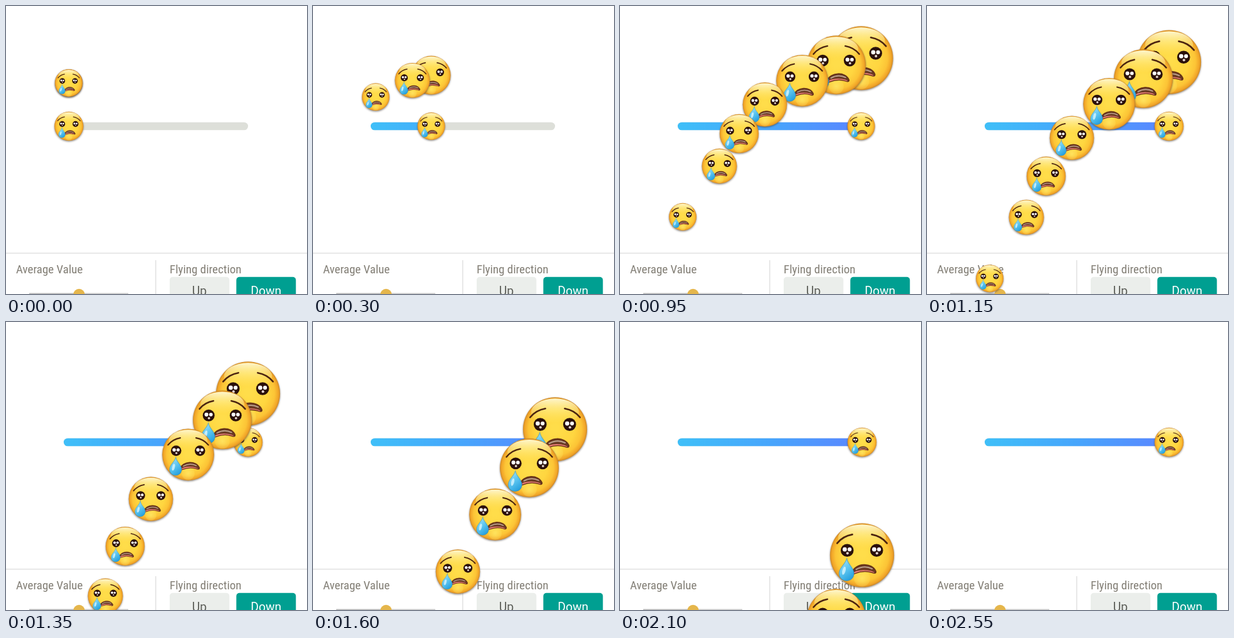
Recreate the animation shown at these times as an HTML page with a canvas. Size 480 by 460 pixels, loop 2600 ms.

```html
<!DOCTYPE html>
<html lang="en">
<head>
<meta charset="utf-8">
<title>Emoji slider</title>
<style>
  html, body { margin: 0; width: 100%; height: 100%; overflow: hidden; background: #fff; }
  canvas { display: block; }
</style>
</head>
<body>
<canvas id="stage" width="480" height="460"></canvas>
<script>
const ctx = document.getElementById('stage').getContext('2d');
const LOOP = 2600, LEFT = 100, RIGHT = 386, BAR_Y = 192, BAR_H = 12.6;
const RELEASE = 984, GRAVITY = 0.000232;

// Thumb path: [ms, x]
const DRAG = [[0, 100], [172, 158.5], [300, 188.5], [320, 190], [476, 231],
  [652, 290], [700, 290.5], [816, 345], [950, 384.5], [RELEASE, 386]];
// Dropped faces: [ms of drop, x, y]
const DROPS = [[-9, 100, 123], [172, 158.5, 115], [320, 190, 111.5], [476, 231, 105],
  [652, 290.5, 98.5], [816, 345, 90], [RELEASE, 386, 83]];

const clamp = v => Math.min(1, Math.max(0, v));
const progress = x => (x - LEFT) / (RIGHT - LEFT);
const faceRadius = x => 22.2 + 29.4 * progress(x);

function thumbX(t) {
  for (let i = 1; i < DRAG.length; i++) {
    const [t0, x0] = DRAG[i - 1], [t1, x1] = DRAG[i];
    if (t < t1) return x0 + (x1 - x0) * (t - t0) / (t1 - t0);
  }
  return RIGHT;
}

function box(x, y, w, h, r, fill) {
  ctx.fillStyle = fill;
  ctx.beginPath();
  ctx.roundRect(x, y, w, h, r);
  ctx.fill();
}

function oval(x, y, rx, ry, fill, turn = 0) {
  ctx.fillStyle = fill;
  ctx.beginPath();
  ctx.ellipse(x, y, rx, ry, turn, 0, Math.PI * 2);
  ctx.fill();
}

const disc = (x, y, r, fill) => oval(x, y, r, r, fill);

function label(text, x, y, font, color, align = 'left') {
  ctx.font = font;
  ctx.textAlign = align;
  ctx.fillStyle = color;
  ctx.fillText(text, x, y);
}

function textWidth(font) {
  ctx.font = font;
  return ctx.measureText('Average Value').width;
}

function gradient(g, ...stops) {
  stops.forEach(([at, color]) => g.addColorStop(at, color));
  return g;
}

// Headings are condensed where the font offers it, else regular and smaller.
const CONDENSED = 'condensed 19px "Roboto Condensed", Roboto, sans-serif';
const hasCondensed = textWidth(CONDENSED) < 0.95 * textWidth('19px Roboto, sans-serif');
const HEADING = hasCondensed ? CONDENSED : '17px Roboto, sans-serif';
const BUTTON = '19.3px Roboto, sans-serif';

const barFill = gradient(ctx.createLinearGradient(92, 0, 386, 0),
  [0, '#3fbff8'], [0.5, '#47a5fc'], [1, '#5b85ff']);
const skin = gradient(ctx.createRadialGradient(0, -0.05, 0.1, 0, 0, 1),
  [0, '#ffdd4a'], [0.55, '#ffd640'], [0.8, '#fcc436'], [0.93, '#f1a528'], [1, '#c98428']);
const shine = gradient(ctx.createLinearGradient(0, -0.95, 0, -0.2),
  [0, 'rgba(255,252,215,.95)'], [0.45, 'rgba(255,244,160,.55)'], [1, 'rgba(255,235,120,0)']);
const glow = gradient(ctx.createRadialGradient(0, 0.72, 0, 0, 0.72, 0.4),
  [0, 'rgba(255,236,110,.7)'], [1, 'rgba(255,225,90,0)']);
const tearFill = gradient(ctx.createLinearGradient(-0.7, 0.2, -0.25, 0.75),
  [0, '#a2e0f8'], [0.45, '#5cc5f0'], [1, '#1b98da']);

function brow(side) {
  ctx.beginPath();
  ctx.moveTo(side * 0.77, -0.37);
  ctx.quadraticCurveTo(side * 0.59, -0.59, side * 0.3, -0.64);
  ctx.stroke();
}

function eye(x) {
  disc(x, -0.15, 0.2, '#2a100b');
  disc(x - 0.075, -0.18, 0.065, '#fff');
  disc(x + 0.075, -0.18, 0.06, '#fff');
  disc(x + 0.01, -0.06, 0.04, '#e2d3cd');
}

function mouthPath() {
  ctx.beginPath();
  ctx.moveTo(-0.32, 0.55);
  ctx.bezierCurveTo(-0.22, 0.22, 0.32, 0.21, 0.43, 0.5);
  ctx.bezierCurveTo(0.44, 0.57, 0.38, 0.57, 0.31, 0.54);
  ctx.quadraticCurveTo(0.05, 0.46, -0.22, 0.57);
  ctx.quadraticCurveTo(-0.32, 0.61, -0.32, 0.55);
  ctx.closePath();
}

function mouth() {
  mouthPath();
  ctx.fillStyle = '#6b3a24';
  ctx.fill();
  ctx.save();
  ctx.clip();
  oval(0.06, 0.57, 0.33, 0.11, '#ee8079');
  ctx.strokeStyle = '#b9a08d';
  ctx.lineWidth = 0.04;
  ctx.beginPath();
  ctx.moveTo(-0.18, 0.44);
  ctx.quadraticCurveTo(0.07, 0.3, 0.31, 0.42);
  ctx.stroke();
  ctx.restore();
  mouthPath();
  ctx.strokeStyle = 'rgba(87,35,15,.8)';
  ctx.lineWidth = 0.03;
  ctx.stroke();
}

function tear() {
  ctx.fillStyle = tearFill;
  ctx.beginPath();
  ctx.moveTo(-0.47, 0.09);
  ctx.bezierCurveTo(-0.46, 0.27, -0.25, 0.38, -0.25, 0.56);
  ctx.bezierCurveTo(-0.25, 0.87, -0.71, 0.87, -0.71, 0.56);
  ctx.bezierCurveTo(-0.71, 0.38, -0.5, 0.27, -0.47, 0.09);
  ctx.fill();
  ctx.strokeStyle = 'rgba(25,130,195,.45)';
  ctx.lineWidth = 0.025;
  ctx.stroke();
  oval(-0.56, 0.48, 0.05, 0.13, 'rgba(225,248,255,.75)', 0.25);
}

function face(x, y, r) {
  ctx.save();
  ctx.translate(x, y);
  ctx.scale(r, r);
  ctx.shadowColor = 'rgba(70,60,50,.6)';
  ctx.shadowBlur = 3;
  ctx.shadowOffsetY = 1.3;
  disc(0, 0, 0.99, skin);
  ctx.shadowColor = 'transparent';
  oval(0, -0.53, 0.74, 0.42, shine);
  disc(0, 0.72, 0.25, glow);
  ctx.lineCap = 'round';
  ctx.strokeStyle = '#4b2410';
  ctx.lineWidth = 0.052;
  brow(-1);
  brow(1);
  eye(-0.46);
  eye(0.45);
  mouth();
  tear();
  ctx.restore();
}

function panel() {
  ctx.fillStyle = '#e1e1e1';
  ctx.fillRect(0, 394, 480, 1.5);
  ctx.fillRect(238, 406, 1.5, 54);
  label('Average Value', 16, 427, HEADING, '#827e75');
  label('Flying direction', 261, 427, HEADING, '#827e75');
  box(37, 458.5, 80, 3, 0, '#b9b9b9');
  box(117, 458.5, 78, 3, 0, '#cbcbcb');
  disc(116.5, 461, 9.2, '#e5b64c');
  box(261, 432.7, 95.3, 40, 5, '#ebeeeb');
  box(367.3, 432.7, 95, 40, 5, '#009f91');
  label('Up', 308.5, 461.5, BUTTON, '#5b5d57', 'center');
  label('Down', 414.7, 461.5, BUTTON, '#fff', 'center');
}

function draw(t) {
  const x = thumbX(t);
  ctx.fillStyle = '#fff';
  ctx.fillRect(0, 0, 480, 460);
  panel();

  const barTop = BAR_Y - BAR_H / 2;
  box(92, barTop, 294, BAR_H, BAR_H / 2, '#dddfd9');
  box(92, barTop, x - 92, BAR_H, BAR_H / 2, barFill);
  const pressed = clamp(t / 150) - clamp((t - RELEASE) / 150);
  face(x, BAR_Y, 23.4 - 1.2 * pressed);

  // The face being dragged sits behind those already dropped.
  if (t < RELEASE) face(x, 123 - 40 * progress(x), faceRadius(x));
  for (let i = DROPS.length - 1; i >= 0; i--) {
    const [start, dropX, dropY] = DROPS[i];
    if (t < start) continue;
    const y = dropY + GRAVITY * (t - start) ** 2, r = faceRadius(dropX);
    if (y - r < 460) face(dropX, y, r);
  }
}

const began = performance.now();
function tick() {
  draw((performance.now() - began) % LOOP);
  requestAnimationFrame(tick);
}
tick();
</script>
</body>
</html>
```
